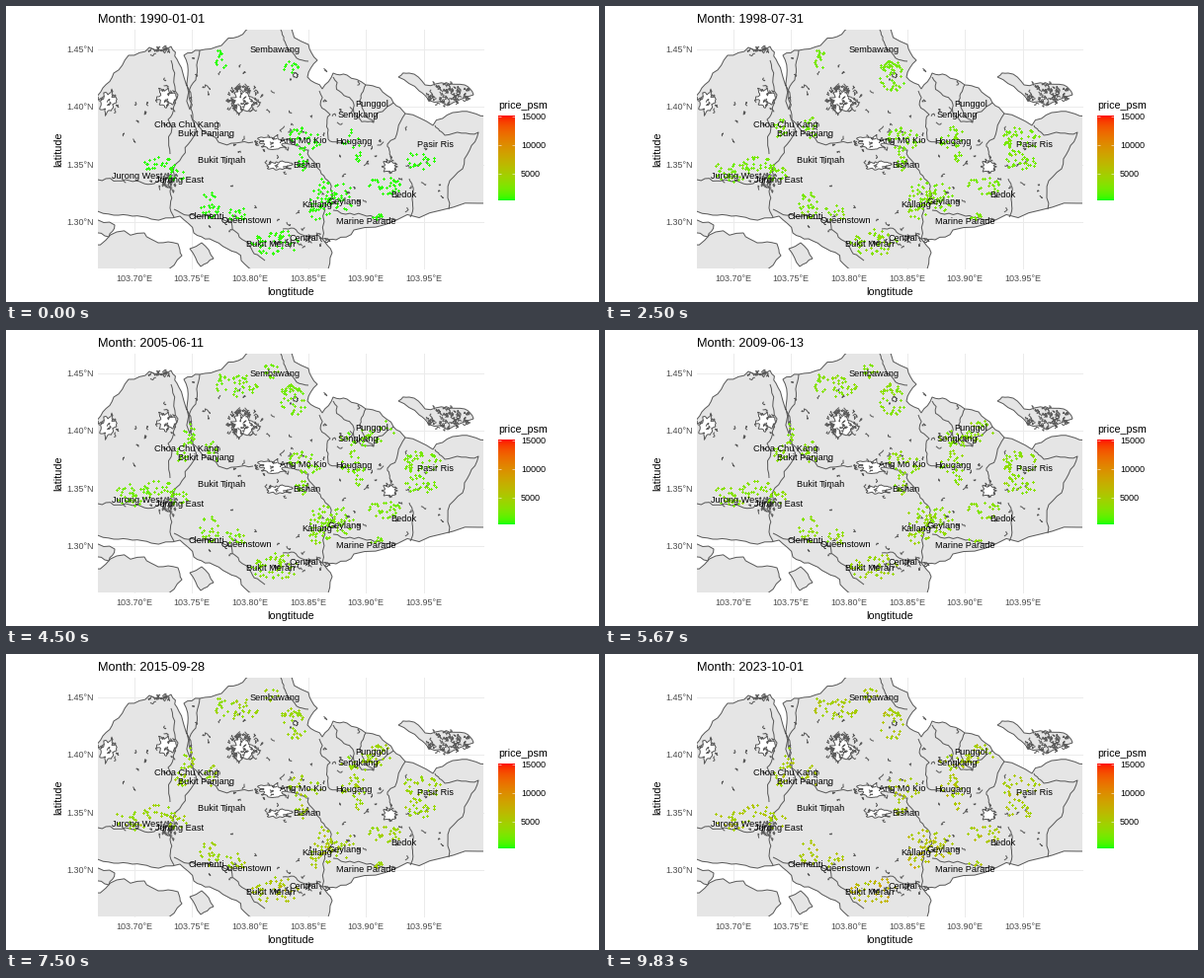
Animation, 600 px wide and 300 px high, one loop 10000 ms. Source, as a matplotlib script:

```python
import numpy as np
import matplotlib.pyplot as plt
from matplotlib.animation import FuncAnimation
from matplotlib.collections import LineCollection
from matplotlib.patches import Polygon, Rectangle

LOOP_MS, STEPS, HOLD = 10000, 60, 4  # each step is held for HOLD ticks
TICKS = STEPS * HOLD
START, DAYS = np.datetime64("1990-01-01"), 12326
PX = 0.72  # points per pixel at 100 dpi
LAND, EDGE, GRID, GREY = "#E5E5E5", "#595959", "#EBEBEB", "#4D4D4D"

plt.rcParams["font.family"] = "Liberation Sans"
rng = np.random.default_rng(12)

fig = plt.figure(figsize=(6, 3), dpi=100, facecolor="white")
ax = fig.add_axes([0, 0, 1, 1])
ax.axis("off")
panel = ax.add_patch(Rectangle((93, 24), 390, 242, fc="white", ec="none", zorder=0))
strokes = []


def text(x, y, s, px, **kw):
    kw = {"ha": "center", "va": "baseline", "color": "black", "zorder": 9, **kw}
    return ax.text(x, y, s, fontsize=px * PX, **kw)


def fractal(points, depth, wiggle=0.09):
    """Split every side again and again, nudging each midpoint."""
    p = np.reshape(np.array(points, float), (-1, 2))
    for _ in range(depth):
        side = np.diff(p, axis=0)
        nudge = rng.normal(0, wiggle, (len(side), 1)) * side[:, ::-1] * [-1, 1]
        mid = p[:-1] + side / 2 + nudge
        p = np.insert(p, np.arange(1, len(p)), mid, axis=0)
    return p


def area(*points, fc=LAND, z=2):
    p = fractal([*points, *points[:2]], 2)
    ax.add_patch(Polygon(p, fc=fc, ec=EDGE, lw=PX, zorder=z)).set_clip_path(panel)


def lake(x, y, rx, ry):
    """Ragged white water with a broken shoreline around it."""
    a = np.linspace(0, 2 * np.pi, 24, endpoint=False)
    r = rng.uniform(0.45, 1, a.size)
    area(*np.c_[x + rx * r * np.cos(a), y + ry * r * np.sin(a)].ravel(), fc="white", z=3)
    scraps(x, y, rx, ry, int(rx * ry / 14))


def line(*points):
    strokes.append(fractal(points, 3))


def disc(x, y, rx, ry, n):
    r, a = np.sqrt(rng.random(n)), rng.uniform(0, 2 * np.pi, n)
    return np.c_[x + rx * r * np.cos(a), y + ry * r * np.sin(a)]


def scraps(x, y, rx, ry, n):
    """Short jagged strokes scattered in an ellipse."""
    walk = np.cumsum(rng.uniform(-2, 2, (n, 5, 2)), axis=1)
    strokes.extend(disc(x, y, rx, ry, n)[:, None] + walk)


# Graticule and axis text
for k in range(6):
    x = 129.5 + 58.7 * k
    ax.plot([x, x], [24, 266], color=GRID, lw=PX, zorder=1)
    text(x, 279, f"{103.70 + 0.05 * k:.2f}°E", 9, color=GREY)
for k in range(4):
    y = 43.5 + 58.5 * k
    ax.plot([93, 483], [y, y], color=GRID, lw=PX, zorder=1)
    text(89, y + 3.2, f"{1.45 - 0.05 * k:.2f}°N", 9, color=GREY, ha="right")
text(288, 293, "longtitude", 10.7)
text(53, 145, "latitude", 10.7, rotation=90, va="center")
title = text(93, 17, "", 12.75, ha="left")

# Main island, clockwise from the north-west
north = [88, 98, 98, 83, 109, 68, 124, 50, 145, 42, 167, 41, 173, 54, 180, 72,
         186, 105, 184, 70, 180, 50, 196, 45, 218, 40, 235, 31, 250, 18, 284, 18,
         306, 39, 315, 55, 305, 72, 320, 84, 331, 68, 345, 70, 364, 80, 378, 83,
         392, 98, 404, 109, 432, 121, 452, 108, 471, 108, 490, 112]
south = [490, 200, 440, 207, 395, 217, 352, 227, 334, 237, 320, 236, 330, 250,
         326, 272, 252, 272, 238, 258, 224, 246, 206, 236, 190, 230, 176, 213,
         147, 216, 128, 213, 109, 212, 88, 207]
area(*north, *south)

# Islands
area(397, 72, 408, 68, 424, 80, 446, 79, 464, 80, 473, 90, 447, 101, 429, 96, 418, 86)
area(88, 242, 112, 229, 140, 230, 154, 240, 174, 241, 178, 253, 160, 270, 88, 270)
area(88, 216, 110, 222, 104, 234, 88, 230)
area(186, 246, 198, 240, 210, 256, 197, 264)

# Reservoirs
lake(162, 92, 11, 13)
lake(103, 98, 10, 14)
lake(240, 96, 16, 14)
lake(270, 138, 20, 8)
lake(276, 162, 15, 6)
lake(388, 163, 9, 8)
lake(164, 177, 6, 9)
lake(293, 70, 3, 3)

# Rivers and district borders
line(196, 45, 192, 75, 187, 104, 192, 128, 172, 160, 166, 188, 170, 214)
line(167, 55, 174, 90, 164, 115, 166, 150)
line(170, 206, 200, 213, 228, 219, 245, 240, 262, 258)
line(187, 110, 215, 138, 250, 138)
line(93, 176, 125, 177, 150, 180, 161, 172)
line(278, 24, 285, 44, 306, 56)
line(317, 86, 328, 110, 326, 135, 345, 140)
line(331, 72, 345, 92, 352, 108, 372, 118)
line(364, 80, 358, 98, 372, 118, 392, 98)
line(291, 140, 306, 146, 319, 170, 331, 192, 320, 236)
line(404, 109, 386, 140, 390, 156)
line(434, 121, 444, 131, 478, 128, 462, 165, 448, 206)
line(408, 175, 412, 190, 409, 214)
line(331, 207, 365, 213, 395, 217)
line(280, 226, 300, 232, 320, 236)

scraps(447, 90, 24, 10, 75)
scraps(240, 94, 18, 15, 45)
scraps(156, 45, 12, 5, 16)
scraps(164, 178, 7, 9, 18)
scraps(298, 236, 32, 9, 24)
scraps(250, 140, 145, 95, 75)
scraps(400, 165, 70, 40, 25)
borders = LineCollection(strokes, colors=EDGE, linewidths=PX, zorder=4)
ax.add_collection(borders, autolim=False)
borders.set_clip_path(panel)

# Flats: x, y, price factor and opening year of every block
CITY = np.array([290, 240])
blocks = []


def estate(x, y, rx, ry, opened=1985):
    n = int(6 + rx * ry * 0.2)
    p = np.rint(disc(x, y, rx, ry, n)) + 0.5
    near = np.exp(-np.hypot(*(p - CITY).T) / 60)
    factor = (0.95 + 0.5 * near) * np.exp(rng.normal(0, 0.1, n))
    blocks.append(np.c_[p, factor, opened + rng.uniform(0, 6, n)])


estate(217, 53, 7, 11)
estate(238, 56, 16, 12, 1999)
estate(268, 41, 8, 8, 1999)
estate(288, 62, 10, 7)
estate(291, 70, 13, 17, 1992)
estate(185, 105, 7, 12, 1999)
estate(177, 124, 8, 10, 1993)
estate(208, 123, 9, 11, 1990)
estate(302, 135, 17, 13)
estate(299, 157, 6, 10)
estate(351, 134, 13, 13, 1988)
estate(356, 153, 5, 6)
estate(356, 109, 22, 9, 2000)
estate(377, 102, 16, 11, 2003)
estate(420, 135, 20, 13, 1991)
estate(419, 157, 18, 10)
estate(383, 182, 18, 9)
estate(338, 193, 14, 15)
estate(317, 195, 13, 23)
estate(374, 213, 8, 4)
estate(205, 202, 10, 14)
estate(233, 209, 13, 8)
estate(271, 239, 26, 13)
estate(154, 160, 15, 8)
estate(173, 170, 11, 9)
estate(128, 167, 18, 11, 1992)
X, Y, FACTOR, OPENED = np.vstack(blocks).T


def ramp(n):
    """Green to red, blended in CIE Lab."""
    t = np.linspace(0, 1, n)
    L, a, b = (u + (v - u) * t for u, v in
               [(87.73, 53.24), (-86.18, 80.09), (83.18, 67.2)])
    fy = (L + 16) / 116
    f = np.stack([fy + a / 500, fy, fy - b / 200])
    xyz = np.where(f > 6 / 29, f ** 3, 3 * (6 / 29) ** 2 * (f - 4 / 29))
    xyz *= np.array([[0.9505], [1.0], [1.089]])
    to_xyz = np.array([[0.4124, 0.3576, 0.1805],
                       [0.2126, 0.7152, 0.0722],
                       [0.0193, 0.1192, 0.9505]])
    rgb = np.clip(np.linalg.solve(to_xyz, xyz), 0, 1)
    rgb = np.where(rgb > 0.0031308, 1.055 * rgb ** (1 / 2.4) - 0.055, 12.92 * rgb)
    return np.clip(rgb, 0, 1).T


COLORS = ramp(256)
flats = ax.scatter([], [], s=(1.36 * PX) ** 2, marker="o", linewidths=0,
                   antialiased=False, zorder=6)
flats.set_clip_path(panel)

for name, x, y in [
        ("Sembawang", 272, 44), ("Punggol", 370, 99), ("Sengkang", 356, 110),
        ("Choa Chu Kang", 183, 120), ("Bukit Panjang", 202.5, 129),
        ("Ang Mo Kio", 301, 136), ("Hougang", 352, 137), ("Pasir Ris", 434, 140),
        ("Bukit Timah", 218.5, 156), ("Bishan", 304, 161), ("Jurong West", 133, 172),
        ("Jurong East", 176, 176), ("Bedok", 402, 191), ("Geylang", 342.5, 198),
        ("Kallang", 315, 201), ("Clementi", 203, 213), ("Queenstown", 243, 217),
        ("Marine Parade", 364.5, 218), ("Central", 301, 235), ("Bukit Merah", 268, 241)]:
    text(x, y + 3.2, name, 9.2)

# Legend
text(498, 104, "price_psm", 10.8, ha="left")
ax.imshow(COLORS[::-1, None], extent=(498, 515, 197, 111), aspect="auto",
          interpolation="bilinear", zorder=5)
for k in range(3):
    y = 111.5 + 29 * k
    for x in (498, 511.6):
        ax.plot([x, x + 3.4], [y, y], color="white", lw=0.4, zorder=6,
                solid_capstyle="butt")
    text(521, y + 3.2, str(15000 - 5000 * k), 9, ha="left")

ax.set_xlim(0, 600)
ax.set_ylim(300, 0)


def update(tick):
    step = min((tick + 1) // HOLD, STEPS - 1)
    day = step * DAYS // (STEPS - 1)
    year = 1990 + day / 365.25
    title.set_text(f"Month: {START + day}")
    pick = np.random.default_rng(100 + step)
    share = 0.85 - 0.009 * (year - 1990)
    seen = (OPENED <= year) & (pick.random(X.size) < share)
    level = np.interp(year, [1990, 1997, 2006, 2013, 2019, 2024],
                      [300, 2200, 2100, 3800, 4000, 4900])
    psm = level * FACTOR * np.exp(pick.normal(0, 0.08, X.size))
    flats.set_offsets(np.c_[X, Y][seen])
    flats.set_facecolors(COLORS[np.clip(psm[seen] / 15000 * 255, 0, 255).astype(int)])
    return title, flats


anim = FuncAnimation(fig, update, frames=TICKS, interval=LOOP_MS / TICKS,
                     repeat=True, repeat_delay=0, blit=False)
plt.show()
```
